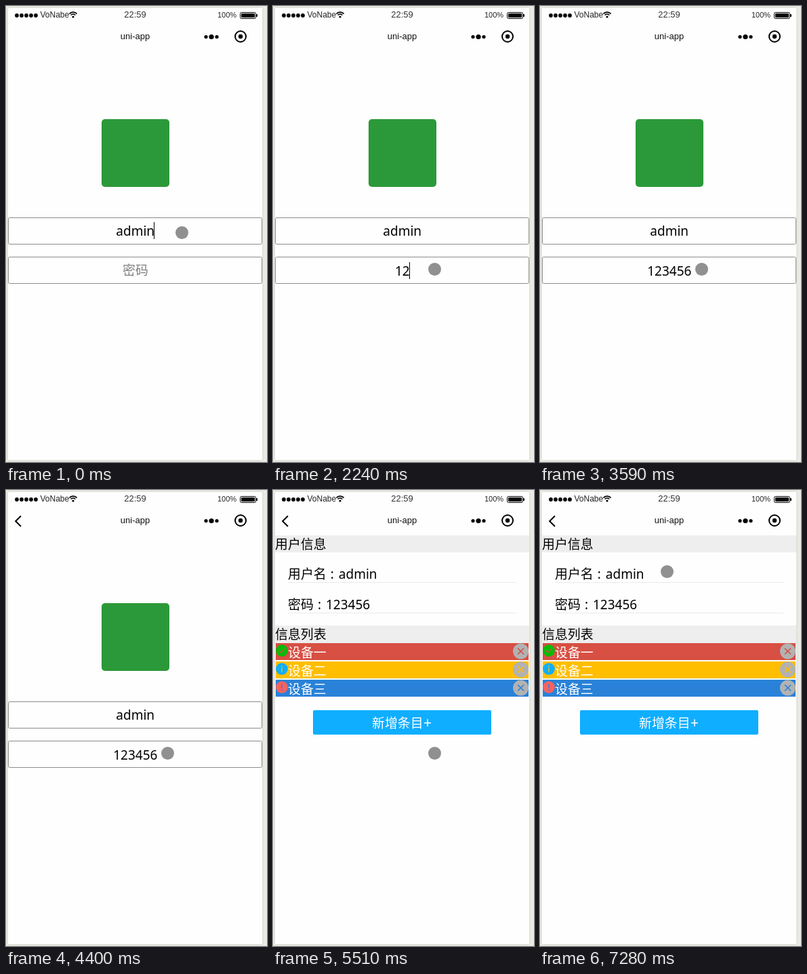
Animation of 385 by 673 pixels, one loop 8 s. Source, as an HTML page with a canvas:

```html
<!DOCTYPE html>
<html lang="zh-CN">
<head>
<meta charset="utf-8">
<title>uni-app login</title>
<style>
html, body { margin: 0; width: 100%; height: 100%; overflow: hidden; background: #ebebe6; }
canvas { display: block; width: 385px; height: 673px; }
</style>
</head>
<body>
<canvas id="stage"></canvas>
<script>
const W = 385, H = 673, LOOP = 8000;
const canvas = document.getElementById('stage');
const ctx = canvas.getContext('2d');
const dpr = window.devicePixelRatio || 1;
canvas.width = W * dpr;
canvas.height = H * dpr;

const SANS = '"Liberation Sans", Arial, sans-serif';
const BODY = '19px "Noto Sans", "Noto Sans CJK SC", sans-serif';
const CJK = '18.9px "Noto Sans CJK SC", "Noto Sans CJK", sans-serif';

// Each list holds [start time, value...]; values hold until the next entry.
const pointerSteps = [
  [0, 259.5, 334.5], [710, 256.5, 344.5], [860, 251, 358], [980, 242, 378],
  [1100, 238.5, 388.5], [6070, 211.5, 446.5], [6220, 202.5, 464.5],
  [6340, 219.5, 449.5], [6740, 228.5, 390], [6860, 197.5, 306.5],
  [7010, 186, 185], [7160, 186, 150], [7280, 187.5, 120.5]
];
const caretSteps = [
  [0, 'user'], [460, ''], [980, 'user'], [1220, 'pass'], [1780, ''],
  [2090, 'pass'], [3590, ''], [4120, 'pass'], [4400, '']
];
const typeSteps = [[0, 0], [2090, 1], [2240, 2], [2540, 3], [2790, 4], [2910, 5], [3190, 6]];
const slideSteps = [[0, 375], [5390, 156], [5510, 0]];

const items = [
  { name: '设备一', bar: '#d84f43', icon: '#09bb07', mark: 'check' },
  { name: '设备二', bar: '#ffbe00', icon: '#10aeff', mark: 'info' },
  { name: '设备三', bar: '#2982d8', icon: '#f76260', mark: 'warn' }
];

function at(steps, t) {
  let value = steps[0];
  for (const s of steps) if (s[0] <= t) value = s;
  return value.slice(1);
}

function rect(x, y, w, h, color, r = 0) {
  ctx.fillStyle = color;
  ctx.beginPath();
  ctx.roundRect(x, y, w, h, r);
  ctx.fill();
}

function disc(x, y, r, color) {
  ctx.fillStyle = color;
  ctx.beginPath();
  ctx.arc(x, y, r, 0, Math.PI * 2);
  ctx.fill();
}

function line(points, color, width) {
  ctx.strokeStyle = color;
  ctx.lineWidth = width;
  ctx.beginPath();
  points.forEach(([x, y], i) => i ? ctx.lineTo(x, y) : ctx.moveTo(x, y));
  ctx.stroke();
}

function text(str, x, y, font, color = '#000', align = 'left') {
  ctx.font = font;
  ctx.fillStyle = color;
  ctx.textAlign = align;
  ctx.fillText(str, x, y);
}

function drawPhone() {
  rect(0, 0, W, H, '#ebebe6');
  ctx.save();
  ctx.shadowColor = 'rgba(0,0,0,0.12)';
  ctx.shadowBlur = 4 * dpr;
  rect(3, 3, 375, 667, '#fefefe');
  ctx.restore();
}

function drawHeader(showBack) {
  for (let i = 0; i < 5; i++) disc(16 + i * 7, 14, 2.9, '#000');
  text('VoNabe', 50.5, 17, '12px ' + SANS, '#222');

  ctx.strokeStyle = '#000';
  ctx.lineWidth = 1.6;
  for (const r of [4.4, 7.4]) {
    ctx.beginPath();
    ctx.arc(99, 16.5, r, -Math.PI * 0.77, -Math.PI * 0.23);
    ctx.stroke();
  }
  disc(99, 16, 1.6, '#000');

  text('22:59', 190.5, 17, '13px ' + SANS, '#333', 'center');
  text('100%', 312, 17, '11px ' + SANS, '#222');
  ctx.lineWidth = 1;
  ctx.beginPath();
  ctx.roundRect(345.5, 9.5, 23, 9, 2);
  ctx.stroke();
  rect(347, 11, 20, 6, '#000', 1);
  rect(369, 12, 2, 4, '#000', 1);

  text('uni-app', 190.5, 49, '13px ' + SANS, '#111', 'center');
  disc(295, 45.5, 2.6, '#000');
  disc(303, 45.5, 3.6, '#000');
  disc(311, 45.5, 2.6, '#000');
  ctx.lineWidth = 2;
  ctx.beginPath();
  ctx.arc(346, 45, 8, 0, Math.PI * 2);
  ctx.stroke();
  disc(346, 45, 3.2, '#000');
  if (showBack) line([[22, 38.2], [14.2, 46], [22, 53.8]], '#000', 2);
}

function drawField(y) {
  ctx.strokeStyle = '#8c8c8c';
  ctx.lineWidth = 1;
  ctx.beginPath();
  ctx.roundRect(3.5, y + 0.5, 374, 39, 2);
  ctx.stroke();
}

function drawLogin(typed, caret) {
  rect(141, 167, 100, 100, '#2b9939', 5);
  drawField(312);
  drawField(370);
  text('admin', 190.7, 339, BODY, '#000', 'center');
  if (typed) text('123456'.slice(0, typed), 190.8, 398, BODY, '#000', 'center');
  else text('密码', 172, 397, CJK, '#808080');
  if (caret === 'user') rect(218, 319, 1, 25, '#000');
  if (caret === 'pass') rect(Math.floor(191 + 5.45 * typed), 378, 1, 25, '#000');
}

function drawMark(kind, x, y, color) {
  if (kind === 'check') {
    line([[x - 4.5, y], [x - 1.5, y + 3], [x + 4.5, y - 3.2]], color, 1.2);
    return;
  }
  const flip = kind === 'info' ? 1 : -1;
  line([[x, y - 1.8 * flip], [x, y + 4.6 * flip]], color, 1.3);
  disc(x, y - 4 * flip, 0.9, color);
}

function drawItem(item, i) {
  const y = 226 + i * 27;
  rect(4, y, 373, 25, item.bar);
  disc(13, y + 11, 8.8, item.icon);
  drawMark(item.mark, 13, y + 11, item.bar);
  text(item.name, 22, y + 20.5, CJK, '#fff');
  const cx = 365.5, cy = y + 12;
  disc(cx, cy, 11.5, '#b2b2b2');
  line([[cx - 4.5, cy - 4.5], [cx + 4.5, cy + 4.5]], item.bar, 1.6);
  line([[cx + 4.5, cy - 4.5], [cx - 4.5, cy + 4.5]], item.bar, 1.6);
}

function drawRow(label, value, y) {
  const end = 22 + label.length * 18.8;
  text(label, 22, y, CJK);
  text(':', end + 9, y, BODY, '#000', 'center');
  text(value, end + 18.4, y, BODY);
  rect(22, y + 5, 337, 1, '#eaeaea');
}

function drawDetails(shift) {
  ctx.save();
  ctx.beginPath();
  ctx.rect(3, 67, 375, 603);
  ctx.clip();
  ctx.translate(shift, 0);
  rect(3, 67, 375, 603, '#fefefe');
  rect(3, 67, 375, 25, '#eee');
  text('用户信息', 3, 87, CJK);
  drawRow('用户名', 'admin', 131);
  drawRow('密码', '123456', 176);
  rect(3, 200, 375, 26, '#eee');
  text('信息列表', 3, 220, CJK);
  items.forEach(drawItem);
  rect(59, 325, 263, 36, '#10aeff', 2);
  text('新增条目', 146, 351, CJK, '#fff');
  text('+', 222, 351, '21px "Noto Sans", sans-serif', '#fff');
  ctx.restore();
}

function draw(t) {
  const [shift] = at(slideSteps, t);
  ctx.setTransform(dpr, 0, 0, dpr, 0, 0);
  drawPhone();
  if (shift > 0) drawLogin(at(typeSteps, t)[0], at(caretSteps, t)[0]);
  if (shift < 375) drawDetails(shift);
  drawHeader(t >= 4400);
  const [px, py] = at(pointerSteps, t);
  disc(px, py, 9.5, '#909090');
}

const start = performance.now();
function tick() {
  draw((performance.now() - start) % LOOP);
  requestAnimationFrame(tick);
}
tick();
</script>
</body>
</html>
```
